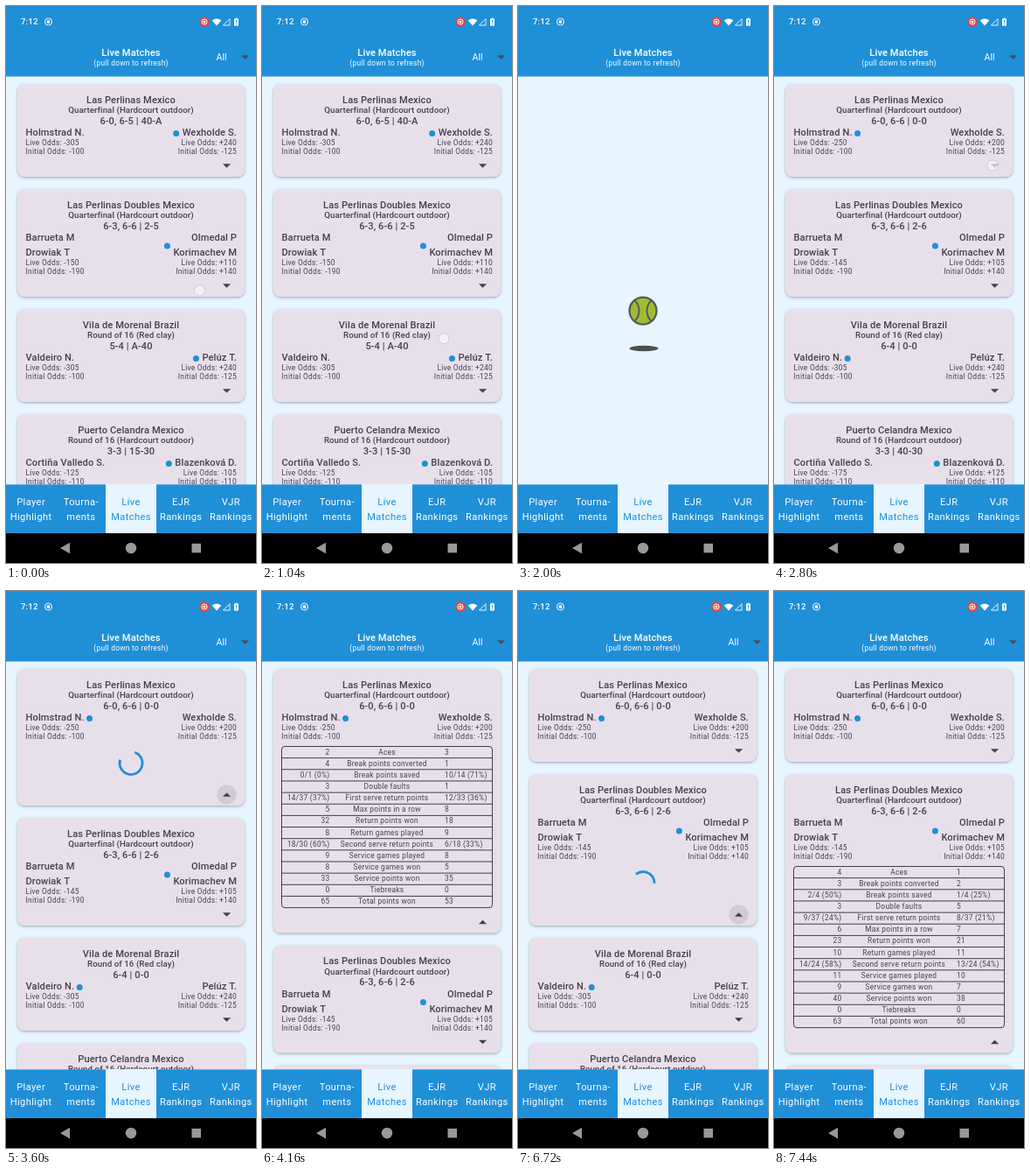
These frames come from a looping animation (286x636 px, 8 s). An HTML page with a canvas:

```html
<!DOCTYPE html>
<html lang="en">
<head>
<meta charset="utf-8">
<title>Live Matches</title>
<style>
  html, body { margin: 0; width: 100%; height: 100%; overflow: hidden; background: #e6f5ff; }
  canvas { display: block; width: 286px; height: 636px; }
</style>
</head>
<body>
<canvas id="stage"></canvas>
<script>
const W = 286, H = 636, LOOP = 8000, STEP = 80;
const BLUE = '#1f8fd8', PALE = '#e6f5ff', CARD = '#e7e0eb', INK = '#45414a', DARK = '#302d33';
const canvas = document.getElementById('stage');
const ctx = canvas.getContext('2d');
const dpr = window.devicePixelRatio || 1;
canvas.width = W * dpr;
canvas.height = H * dpr;
ctx.scale(dpr, dpr);

// Event times in ms
const LOAD = 1280, LOADED = 2160;
const TAPS = [
  { card: 0, show: 2800, press: 3120, open: 3200, ready: 4080, x: 250, y: 182 },
  { card: 1, show: 6400, press: 6480, open: 6640, ready: 7360, x: 245, y: 519 }
];

const LABELS = ['Aces', 'Break points converted', 'Break points saved', 'Double faults',
  'First serve return points', 'Max points in a row', 'Return points won', 'Return games played',
  'Second serve return points', 'Service games played', 'Service games won',
  'Service points won', 'Tiebreaks', 'Total points won'];

// Two-element arrays hold the value before and after the refresh.
const MATCHES = [
  { title: 'Las Perlinas Mexico', round: 'Quarterfinal (Hardcourt outdoor)',
    score: ['6-0, 6-5 | 40-A', '6-0, 6-6 | 0-0'], serve: ['right', 'left'],
    left: ['Holmstrad N.'], right: ['Wexholde S.'],
    live: [['-305', '+240'], ['-250', '+200']], initial: ['-100', '-125'],
    stats: ['2|4|0/1 (0%)|3|14/37 (37%)|5|32|8|18/30 (60%)|9|8|33|0|65',
            '3|1|10/14 (71%)|1|12/33 (36%)|8|18|9|6/18 (33%)|8|5|35|0|53'] },
  { title: 'Las Perlinas Doubles Mexico', round: 'Quarterfinal (Hardcourt outdoor)',
    score: ['6-3, 6-6 | 2-5', '6-3, 6-6 | 2-6'], serve: ['right', 'right'],
    left: ['Barrueta M', 'Drowiak T'], right: ['Olmedal P', 'Korimachev M'],
    live: [['-150', '+110'], ['-145', '+105']], initial: ['-190', '+140'],
    stats: ['4|3|2/4 (50%)|3|9/37 (24%)|6|23|10|14/24 (58%)|11|9|40|0|63',
            '1|2|1/4 (25%)|5|8/37 (21%)|7|21|11|13/24 (54%)|10|7|38|0|60'] },
  { title: 'Vila de Morenal Brazil', round: 'Round of 16 (Red clay)',
    score: ['5-4 | A-40', '6-4 | 0-0'], serve: ['right', 'left'],
    left: ['Valdeiro N.'], right: ['Pelúz T.'],
    live: [['-305', '+240'], ['-305', '+240']], initial: ['-100', '-125'] },
  { title: 'Puerto Celandra Mexico', round: 'Round of 16 (Hardcourt outdoor)',
    score: ['3-3 | 15-30', '3-3 | 40-30'], serve: ['right', 'right'],
    left: ['Cortiña Valledo S.'], right: ['Blazenková D.'],
    live: [['-125', '-105'], ['-175', '+125']], initial: ['-110', '-110'] }
];
const TABS = [['Player', 'Highlight'], ['Tourna-', 'ments'], ['Live', 'Matches'],
  ['EJR', 'Rankings'], ['VJR', 'Rankings']];

const clamp = v => Math.min(1, Math.max(0, v));
const ease = v => { v = clamp(v); return v * v * (3 - 2 * v); };
const easeOut = v => 1 - (1 - clamp(v)) ** 3;

// Draws a line of text whose capitals are centred on y; returns its width.
function text(str, x, y, { size = 11.1, weight = 500, align = 'center', color = INK, space = 0.1 } = {}) {
  ctx.font = `${weight} ${size}px Roboto, sans-serif`;
  ctx.letterSpacing = space + 'px';
  ctx.textAlign = align;
  ctx.fillStyle = color;
  ctx.fillText(str, x, y + size * 0.355);
  return ctx.measureText(str).width;
}
const small = (str, x, y, align, color = INK) =>
  text(str, x, y, { size: 8.35, weight: 400, align, color, space: 0.28 });

function disc(x, y, r, color, rx = r) {
  ctx.fillStyle = color;
  ctx.beginPath();
  ctx.ellipse(x, y, rx, r, 0, 0, 7);
  ctx.fill();
}
function ring(x, y, r, color, width, from = 0, to = Math.PI * 2) {
  ctx.strokeStyle = color;
  ctx.lineWidth = width;
  ctx.beginPath();
  ctx.arc(x, y, r, from, to);
  ctx.stroke();
}
function poly(points, color) {
  ctx.fillStyle = color;
  ctx.beginPath();
  points.forEach(([x, y]) => ctx.lineTo(x, y));
  ctx.fill();
}
function rect(x, y, w, h, color) {
  ctx.fillStyle = color;
  ctx.fillRect(x, y, w, h);
}
function caret(x, y, up, color = INK) {
  const d = up ? -2.2 : 2.2;
  poly([[x - 4.6, y - d], [x + 4.6, y - d], [x, y + d]], color);
}

function touch(x, y, alpha) {
  ctx.globalAlpha = alpha;
  disc(x, y, 6, 'rgba(245,245,252,.8)');
  ring(x, y, 6, '#c3c4d2', 0.8);
  ctx.globalAlpha = 1;
}

function spinner(x, y, age) {
  const half = 666, p = age % (2 * half);
  const head = 270 * easeOut(p / half), tail = 270 * easeOut((p - half) / half);
  const turn = 0.18 * age + 270 * Math.floor(age / (2 * half)) - 150;
  const rad = Math.PI / 180;
  ring(x, y, 13, BLUE, 2.8, (turn + tail) * rad, (turn + head + 8) * rad);
}

function table(top, [left, right]) {
  const row = 13.15;
  const a = left.split('|'), b = right.split('|');
  ctx.strokeStyle = DARK;
  ctx.lineWidth = 0.9;
  ctx.beginPath();
  ctx.roundRect(22.5, top, 241, row * LABELS.length, 3.5);
  for (let i = 1; i < LABELS.length; i++) {
    ctx.moveTo(22.5, top + i * row);
    ctx.lineTo(263.5, top + i * row);
  }
  ctx.stroke();
  LABELS.forEach((label, i) => {
    const y = top + (i + 0.46) * row;
    small(a[i], 77.5, y, 'right');
    small(label, 143, y, 'center');
    small(b[i], 209, y, 'left');
  });
}

// Draws one match and returns the top of the next card.
function card(match, top, fresh, tap, t) {
  const extraName = (match.left.length - 1) * 17;
  const isOpen = tap && t >= tap.open;
  const isReady = tap && t >= tap.ready;
  const height = 106 + extraName + (isReady ? 195.5 : isOpen ? 50 : 0);

  ctx.save();
  ctx.shadowColor = 'rgba(60,60,80,.4)';
  ctx.shadowBlur = 3 * dpr;
  ctx.shadowOffsetY = 1.2 * dpr;
  ctx.fillStyle = CARD;
  ctx.beginPath();
  ctx.roundRect(13, top, 260, height, 8);
  ctx.fill();
  ctx.restore();

  text(match.title, 143, top + 18);
  text(match.round, 143, top + 30, { size: 9.7, space: 0.07 });
  text(match.score[fresh], 143, top + 42);

  const widest = { left: 0, right: 0 };
  ['left', 'right'].forEach((side, i) => {
    const x = i ? 264 : 22.5;
    match[side].forEach((name, n) => {
      widest[side] = Math.max(widest[side], text(name, x, top + 55.5 + 17 * n, { align: side }));
    });
    small('Live Odds: ' + match.live[fresh][i], x, top + 67.5 + extraName, side);
    small('Initial Odds: ' + match.initial[i], x, top + 77.5 + extraName, side);
  });
  const serve = match.serve[fresh];
  const dotX = serve === 'left' ? 22.5 + widest.left + 6 : 264 - widest.right - 7;
  disc(dotX, top + 56.5 + extraName / 2, 3.5, BLUE);

  const arrowY = top + height - 12.5;
  if (tap && t >= tap.press) {
    const grow = ease((t - tap.press + STEP) / 240);
    const fade = 1 - clamp((t - tap.open - 400) / 320);
    disc(252.5, arrowY, 11 * grow, `rgba(70,65,80,${0.13 * fade})`);
  }
  caret(252.5, arrowY, isOpen);
  if (isReady) table(top + 88.5 + extraName, match.stats);
  else if (isOpen) spinner(143, top + 107.5 + extraName, t - tap.open + 40);
  return top + height + 14;
}

function ball(t) {
  const phase = ((t - 1360) / 800 + 0.3) % 1;
  const u = (phase + 1) % 1;
  const x = 143, y = 374 - 72 * 4 * u * (1 - u);
  disc(144, 391, 3.2, '#4d4d4f', 16.5);
  disc(x, y, 15.5, '#9fbc32');
  ctx.save();
  ctx.beginPath();
  ctx.arc(x, y, 15.5, 0, 7);
  ctx.clip();
  ring(x - 21, y, 16.5, '#55585a', 2);
  ring(x + 21, y, 16.5, '#55585a', 2);
  ctx.restore();
  ring(x, y, 15.5, '#55585a', 2.2);
}

function header(loading) {
  rect(0, 0, W, 80.5, BLUE);
  text('7:12', 17, 18, { size: 9.7, align: 'left', color: '#fff' });
  ring(48.5, 18, 4, '#fff', 1);
  disc(48.5, 18, 1.9, '#fff');
  disc(227, 18, 5.7, '#e5453a');
  ring(227, 18, 3.1, '#fff', 1);
  disc(227, 18, 1.5, '#fff');
  ctx.fillStyle = '#fff';
  ctx.beginPath();
  ctx.moveTo(241, 22.5);
  ctx.arc(241, 22.5, 8, -Math.PI * 0.73, -Math.PI * 0.27);
  ctx.fill();
  ctx.strokeStyle = '#fff';
  ctx.lineWidth = 0.9;
  ctx.beginPath();
  ctx.moveTo(248.5, 22);
  ctx.lineTo(256, 22);
  ctx.lineTo(256, 14.5);
  ctx.closePath();
  ctx.stroke();
  rect(261, 14.5, 5, 8, '#fff');
  rect(262.5, 13.5, 2, 1, '#fff');
  rect(263, 16, 1, 3, BLUE);
  rect(263, 20, 1, 1, BLUE);
  text('Live Matches', 143, 53.5, { color: '#fff' });
  small('(pull down to refresh)', 143, 65, 'center', '#fff');
  if (!loading) {
    text('All', 240.5, 58.5, { size: 10.5, weight: 400, align: 'left', color: '#fff' });
    caret(273.5, 58.5, false, '#4c4c4c');
  }
}

function footer() {
  rect(0, 546.4, W, 55.6, BLUE);
  const width = W / TABS.length;
  TABS.forEach((lines, i) => {
    const active = i === 2;
    const left = Math.round(width * i), right = Math.round(width * (i + 1));
    if (active) rect(left, 546, right - left, 56, PALE);
    lines.forEach((line, n) => text(line, width * (i + 0.5), 566.5 + 16.5 * n,
      { weight: 400, space: 0.4, color: active ? BLUE : '#fff' }));
  });
  rect(0, 602, W, 34, '#000');
  poly([[62, 619], [73, 612.8], [73, 625.2]], '#999');
  disc(143, 619, 6.2, '#999');
  rect(212.5, 613.8, 10.5, 10.5, '#999');
}

function draw(t) {
  const loading = t >= LOAD && t < LOADED;
  const fresh = t >= LOADED ? 1 : 0;
  const current = t >= TAPS[1].open ? TAPS[1] : TAPS[0];
  rect(0, 0, W, H, PALE);
  if (loading) {
    ball(t);
  } else {
    let top = 89;
    MATCHES.forEach((match, i) => {
      const pressed = TAPS[1].card === i && t >= TAPS[1].press;
      const tap = pressed ? TAPS[1] : current.card === i ? current : null;
      top = card(match, top, fresh, tap, t);
    });
  }
  header(loading);
  footer();

  if (t < 1440) {
    const pull = ease((t - 880) / 480);
    touch(221.5 - 52.5 * pull, 325 + 211 * pull, t < 1360 ? 1 : 0.5);
  }
  TAPS.forEach(tap => {
    if (t >= tap.show && t < tap.press + STEP) touch(tap.x, tap.y, 0.9);
  });
}

function tick() {
  const t = performance.now() % LOOP;
  draw(Math.floor(t / STEP) * STEP);
  requestAnimationFrame(tick);
}
tick();
</script>
</body>
</html>
```
